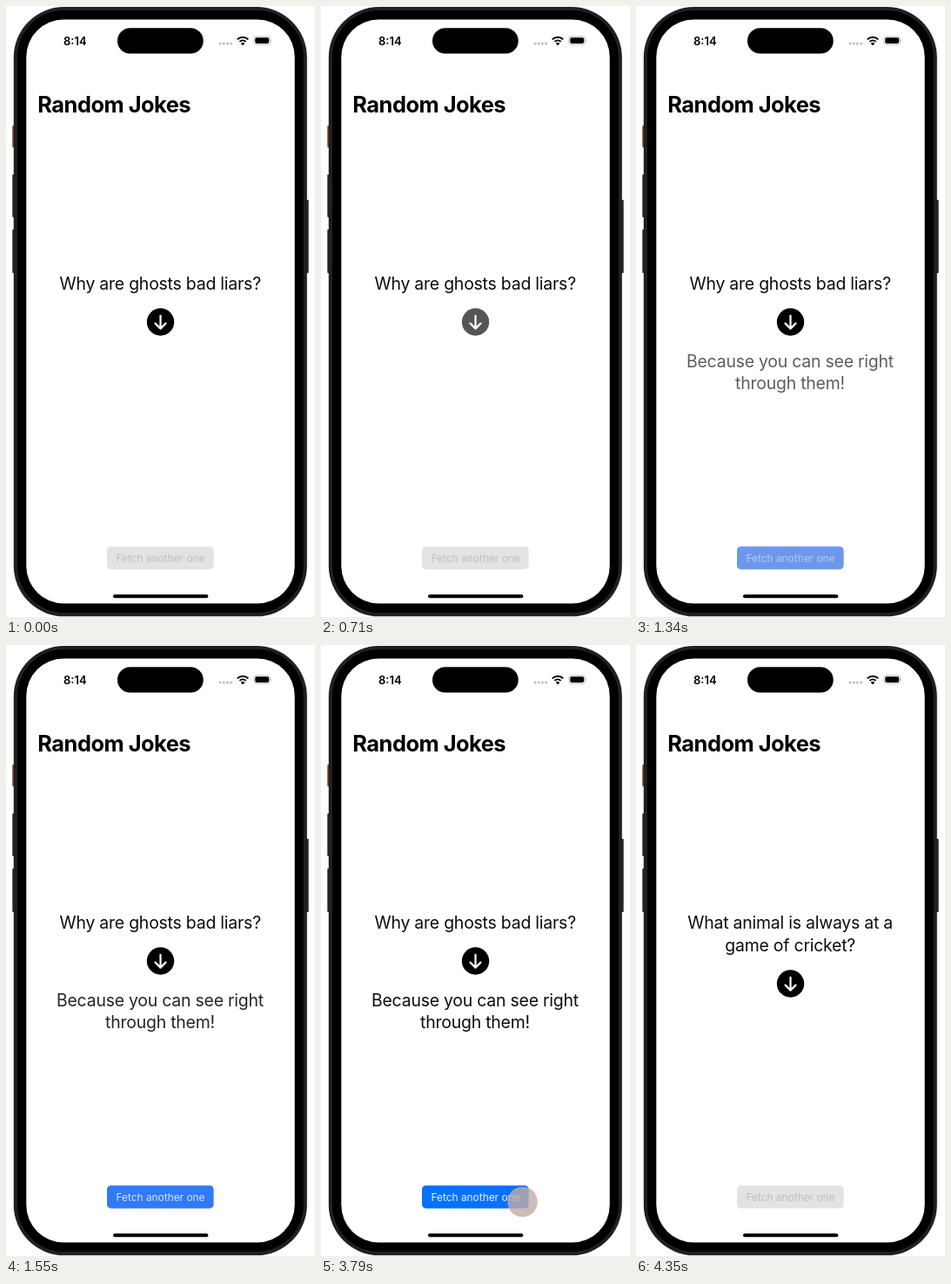
Write an HTML page that moves like this. It is 355 px wide and 700 px high and loops after 8000 ms.

```html
<!DOCTYPE html>
<html lang="en">
<head>
<meta charset="utf-8">
<title>Random Jokes</title>
<style>
html, body { margin: 0; width: 100%; height: 100%; overflow: hidden; background: #fff; }
svg { display: block; width: 355px; height: 700px; font-family: Inter, "Open Sans", sans-serif; }
.joke { font-size: 19.4px; letter-spacing: -.2px; text-anchor: middle; fill: #0c0c0c; }
.clock { font-size: 13px; font-weight: 600; }
.title { font-size: 25.4px; font-weight: 700; letter-spacing: -.5px; }
.label { font-size: 11.9px; text-anchor: middle; }

.old, .new, .answer, .disc, .arrow, .pill, .label, .touch {
  animation: 8s linear infinite;
}
.old { animation-name: old; }
.new { animation-name: new; }
.answer { animation-name: answer; }
.disc { animation-name: press; }
.arrow { animation-name: drop; }
.pill { animation-name: pill; }
.label { animation-name: label; }
.touch { animation-name: touch; }

/* The screen refreshes every 70 ms, so each fade moves in steps. */
@keyframes old {
  0% { opacity: 1; }
  49.125% { opacity: 1; animation-timing-function: steps(4, start); }
  52.625%, 100% { opacity: 0; }
}
@keyframes new {
  0% { opacity: 0; }
  49.125% { opacity: 0; animation-timing-function: steps(4, start); }
  52.625%, 100% { opacity: 1; }
}
@keyframes answer {
  0% { opacity: 0; }
  8.875% { opacity: 0; animation-timing-function: steps(3); }
  11.5% { opacity: .12; animation-timing-function: steps(3); }
  14.125% { opacity: .38; animation-timing-function: steps(3); }
  16.75% { opacity: .67; animation-timing-function: steps(3); }
  19.375% { opacity: .9; animation-timing-function: steps(2); }
  21.125% { opacity: 1; }
  49.125% { opacity: 1; animation-timing-function: steps(4, start); }
  52.625%, 100% { opacity: 0; }
}
@keyframes press {
  0% { fill: #000; }
  6.25% { fill: #000; animation-timing-function: steps(2, start); }
  8% { fill: #707070; animation-timing-function: steps(1); }
  8.875% { fill: #555; animation-timing-function: steps(4); }
  12.375%, 100% { fill: #000; }
}
@keyframes drop {
  0% { transform: translateY(0); }
  49.125% { transform: translateY(0); animation-timing-function: steps(4, start); }
  52.625%, 100% { transform: translateY(26px); }
}
@keyframes pill {
  0% { fill: #e3e3e5; }
  8.875% { fill: #e3e3e5; animation-timing-function: steps(3); }
  11.5% { fill: #d0d4e3; animation-timing-function: steps(3); }
  14.125% { fill: #abb9df; animation-timing-function: steps(3); }
  16.75% { fill: #6d97ea; animation-timing-function: steps(3); }
  19.375% { fill: #307af6; animation-timing-function: steps(2); }
  21.125% { fill: #0672ff; }
  49.125% { fill: #0672ff; animation-timing-function: steps(4, start); }
  52.625%, 100% { fill: #e3e3e5; }
}
@keyframes label {
  0% { fill: #bfbfc2; }
  8.875% { fill: #bfbfc2; animation-timing-function: steps(3); }
  11.5% { fill: #b3b9cd; animation-timing-function: steps(3); }
  14.125% { fill: #a2b1da; animation-timing-function: steps(3); }
  16.75% { fill: #b6c9f3; animation-timing-function: steps(3); }
  19.375% { fill: #d7e4fd; animation-timing-function: steps(2); }
  21.125% { fill: #ecf4ff; }
  49.125% { fill: #ecf4ff; animation-timing-function: steps(4, start); }
  52.625%, 100% { fill: #bfbfc2; }
}
@keyframes touch {
  0%, 47.374% { opacity: 0; }
  47.375%, 49.124% { opacity: .8; }
  49.125%, 100% { opacity: 0; }
}
</style>
</head>
<body>
<svg viewBox="0 0 355 700">
  <!-- phone body -->
  <g fill="#2a2a2a">
    <rect x="7.3" y="193" width="4" height="49" rx="1"/>
    <rect x="7.3" y="256" width="4" height="50" rx="1"/>
    <rect x="343" y="222" width="4.7" height="84" rx="1"/>
  </g>
  <rect x="7.3" y="137" width="4" height="25" rx="1" fill="#7c3d25"/>
  <rect x="8.8" y="1" width="337" height="698.3" rx="58" fill="#202020"/>
  <rect x="13" y="5" width="328.8" height="690" rx="53.5"/>
  <rect x="23.3" y="15.4" width="308.4" height="669.2" rx="43" fill="#fff"/>

  <!-- status bar -->
  <rect x="128" y="25.2" width="98.7" height="29.4" rx="14.7"/>
  <text class="clock" x="66" y="44.5">8:14</text>
  <g fill="#bcbcbc">
    <circle cx="246" cy="43" r="1.5"/><circle cx="250.2" cy="43" r="1.5"/>
    <circle cx="254.4" cy="43" r="1.5"/><circle cx="258.6" cy="43" r="1.5"/>
  </g>
  <g fill="none" stroke="#000" stroke-width="2">
    <path d="M265.8 38.2a8.8 8.8 0 0 1 12.4 0"/>
    <path d="M268.4 40.9a5.2 5.2 0 0 1 7.2 0"/>
  </g>
  <path d="M272 45.2l-2.2-2.3a3.2 3.2 0 0 1 4.4 0z"/>
  <rect x="284.8" y="35" width="18.8" height="9.2" rx="3" fill="none" stroke="#aaa" stroke-width=".8"/>
  <rect x="286.2" y="36.3" width="16" height="6.6" rx="1.8"/>
  <path d="M304.6 38.2q1.6 1.4 0 2.9z" fill="#aaa"/>

  <!-- app -->
  <text class="title" x="36.3" y="121.5">Random Jokes</text>
  <g class="joke">
    <text class="old" x="177.2" y="325.4">Why are ghosts bad liars?</text>
    <text class="new" x="177.2" y="325.4">What animal is always at a<tspan x="177.2" dy="26">game of cricket?</tspan></text>
    <text class="answer" x="177" y="413.5">Because you can see right<tspan x="177" dy="25.8">through them!</tspan></text>
  </g>
  <g class="arrow">
    <circle class="disc" cx="177.5" cy="362" r="15.7"/>
    <path d="M177.5 354.9v14.2M171.5 363.6l6 6 6-6" fill="none" stroke="#fff"
      stroke-width="2.2" stroke-linecap="round" stroke-linejoin="round"/>
  </g>
  <rect class="pill" x="116" y="619.2" width="122.6" height="26.2" rx="4.5"/>
  <text class="label" x="177.5" y="636.9">Fetch another one</text>
  <circle class="touch" cx="231.5" cy="638" r="17.3" fill="#c4aaa6"/>
  <rect x="123" y="674.2" width="109.3" height="4" rx="2"/>
</svg>
</body>
</html>
```
